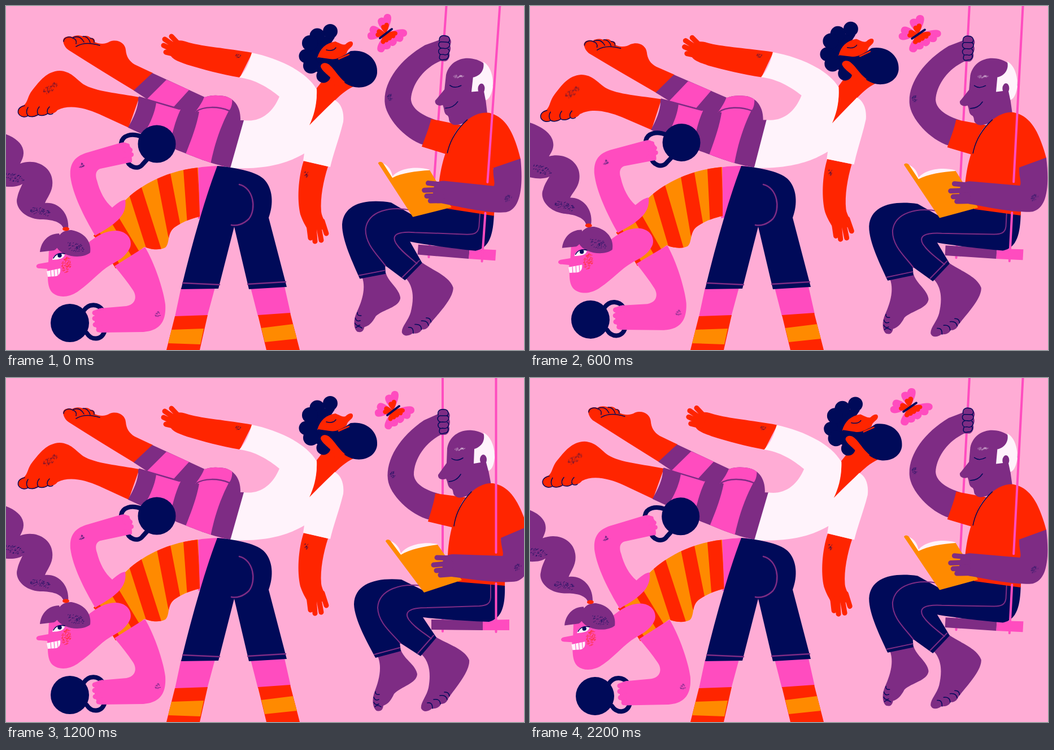
These frames come from a looping animation (917 by 611 pixels, 2400 ms). An HTML page:

```html
<!DOCTYPE html>
<html lang="en">
<head>
<meta charset="utf-8">
<title>Three friends at play</title>
<style>
html, body { margin: 0; width: 100%; height: 100%; overflow: hidden; background: #ffacd5; }
svg { display: block; width: 100vw; height: 100vh; }
path, line, circle, ellipse { fill: none; stroke-linecap: round; }
.red { fill: #ff2500 } .orange { fill: #ff8a00 } .navy { fill: #000a59 }
.purple { fill: #7e2c84 } .pink { fill: #ff4cbf } .white { fill: #fff3fb }
.sRed { stroke: #ff2500 } .sNavy { stroke: #000a59 } .sPurple { stroke: #7e2c84 }
.sPink { stroke: #ff4cbf } .sWhite { stroke: #fff3fb }
.thin { stroke-width: 1.5 } .seam { stroke-width: 2 } .finger { stroke-width: 9 }
.grain { stroke-width: .8; opacity: .75 }
</style>
</head>
<body>
<svg viewBox="0 0 917 611" preserveAspectRatio="none">
<defs>
  <clipPath id="tank"><path d="M340,287C290,292 240,315 210,346L155,408L165,418L194,466L245,428C258,433 272,434 282,429C291,421 284,402 300,392C315,382 330,377 343,374Z"/></clipPath>
  <clipPath id="trunks"><path d="M259,119L352,162C365,157 378,159 386,160C406,164 416,182 415,203L422,203C418,235 412,265 397,287C360,280 335,268 303,256L216,216C226,198 235,180 234,162L249,165L226,150Z"/></clipPath>
</defs>

<g id="flyer">
  <!-- legs -->
  <path class="red" d="M101,62C101,54 112,53 117,55C124,51 131,52 136,54C142,52 147,53 150,57C155,56 158,60 157,64C166,68 176,68 184,63C198,58 211,66 212,78C213,90 218,98 228,104L260,119L228,151C190,128 150,103 112,79C105,75 102,68 101,62Z"/>
  <path class="sNavy thin" d="M102,63C102,56 112,53 118,57Q126,59 124,67M124,72Q140,62 166,70M119,56Q131,51 138,64M136,54Q145,53 149,65M149,57Q157,58 156,65"/>
  <path class="red" d="M95,115C72,116 60,133 47,149C38,160 39,170 32,176C24,178 20,184 22,191C26,198 35,198 39,195C45,199 54,197 57,193C63,196 71,195 74,191C82,193 88,189 91,185C112,174 140,181 165,192L217,216L236,162C200,155 158,152 137,139C122,128 115,116 95,115Z"/>
  <path class="sNavy thin" d="M33,177C23,179 20,185 22,191C26,198 35,198 39,195Q34,188 39,180M39,195Q46,199 57,193Q53,186 59,179M57,193Q65,197 74,191Q71,185 77,179M74,191Q79,194 83,191"/>
  <!-- trunks -->
  <g clip-path="url(#trunks)">
    <path class="purple" d="M200,90H440V300H200Z"/>
    <path class="pink" d="M284,131L249,166L297,179L325,148ZM266,171L309,184C299,205 293,230 289,254L240,232C255,212 264,188 266,171ZM338,187C350,178 376,178 395,185C379,215 368,250 362,281L318,263C327,240 337,215 342,188ZM335,188C346,174 350,165 352,158H398C404,170 397,185 395,185C376,177 352,178 335,188Z"/>
  </g>
  <path class="sPurple" stroke-width="2.5" d="M236,162L307,183M337,187C350,178 376,178 395,186"/>
  <!-- arms -->
  <path class="red" d="M436,83C390,75 350,72 324,65C315,62 303,58 296,66L290,82C290,95 308,99 320,104C350,113 380,121 414,127Z"/>
  <path class="sRed finger" d="M308,70L293,54M304,75L281,59M300,80L279,70M300,86L283,82"/>
  <path class="red" d="M527,275C517,305 515,345 521,370C525,382 530,390 534,397H566C569,388 559,376 558,365C556,340 562,310 570,285Z"/>
  <path class="sRed finger" d="M536,388L539,412M545,390L547,418M553,388L558,416M560,382L567,404"/>
  <!-- head -->
  <path class="red" d="M536,213C548,185 551,165 550,146L570,120L617,142C600,150 590,160 580,170C568,180 548,200 536,213Z"/>
  <path class="navy" d="M545,52L582,56L566,80L572,126L548,116L530,90Z"/>
  <circle class="navy" cx="574" cy="45" r="13"/>
  <circle class="navy" cx="551" cy="53" r="13.5"/>
  <circle class="navy" cx="538" cy="66" r="14"/>
  <circle class="navy" cx="531" cy="89" r="12.5"/>
  <circle class="navy" cx="540" cy="106" r="14"/>
  <circle class="navy" cx="562" cy="124" r="12.5"/>
  <path class="red" d="M551,92C556,75 566,66 583,63C591,66 596,70 601,68C608,61 615,62 614,68C613,74 604,76 603,84L588,97L570,97Z"/>
  <path class="navy" d="M552,91L573,94C583,96 593,92 610,80C638,76 659,95 657,119C655,139 633,149 613,143C597,138 586,125 578,112L556,106Z"/>
  <path class="red" d="M557,108C557,100 568,99 574,106C582,113 587,124 600,135L582,145C581,125 562,121 557,108Z"/>
  <path class="sRed" stroke-width="2.5" d="M589,94L607,86"/>
  <path class="sNavy thin" d="M567,78Q579,81 584,74"/>
  <!-- shirt -->
  <path class="white" d="M435,83C475,91 530,113 550,148C551,175 545,195 537,212L582,167C593,173 599,187 597,206C590,235 580,260 574,286L526,275L528,262C505,275 470,291 397,288L421,203C450,207 472,190 484,161C465,145 440,130 413,127C423,117 431,100 435,83Z"/>
  <g class="grain" data-grain="78 147 15 6 -35 50 sNavy;411 89 6 3 5 16 sNavy;531 299 3 6 0 18 sNavy"></g>
</g>

<g id="lifter">
  <path class="pink" d="M336,288C350,285 365,284 385,284L350,376L340,378Z"/>
  <g clip-path="url(#tank)">
    <path class="orange" d="M140,270H360V480H140Z"/>
    <path class="sRed" stroke-width="25" d="M325,270L334,395M275,280L299,405M223,310L266,445"/>
    <path class="sRed" stroke-width="16" d="M184,365L238,455M152,395L202,475"/>
  </g>
  <!-- raised arm and weight -->
  <circle class="navy" cx="267" cy="245" r="33.5"/>
  <path class="sNavy" stroke-width="8" d="M240,232C222,225 206,230 204,243M213,270C216,287 234,292 242,281L252,270"/>
  <path class="pink" d="M158,408C139,376 118,335 114,303C112,277 124,266 145,260L203,243C214,240 218,247 222,253L223,277L167,289C158,292 158,302 161,310C166,330 175,347 188,358C195,352 203,345 211,344C214,360 206,374 195,383C182,395 170,400 158,408Z"/>
  <path class="sPink" stroke-width="8" d="M207,247L215,248M210,255L220,256M212,264L222,264M210,273L219,274"/>
  <!-- lower arm and weight -->
  <circle class="navy" cx="113" cy="563" r="34"/>
  <path class="sNavy" stroke-width="8" d="M137,542C147,526 164,530 171,540M143,581C151,594 169,594 174,579"/>
  <path class="pink" d="M192,462L246,428C262,455 278,500 282,530C284,561 272,577 243,579L166,580L157,568V543C163,535 171,537 178,536L213,533C230,530 232,516 225,505C215,490 203,475 192,462Z"/>
  <path class="sPink" stroke-width="9" d="M170,541L157,545M170,552L157,555M170,563L158,566M173,574L164,575"/>
  <!-- head -->
  <g id="braid">
    <path class="purple" d="M102,396C98,381 75,379 60,379C30,377 15,355 20,340C22,330 25,325 29,316C18,323 0,323 -40,314V220C0,222 32,238 31,262C31,268 28,274 25,280C52,270 80,285 82,310C84,328 74,338 69,350C92,347 113,368 110,396Z"/>
    <g class="grain" data-grain="60 366 19 7 12 55 sNavy;14 305 18 7 15 50 sNavy"></g>
  </g>
  <path class="pink" d="M76,432C90,422 130,440 145,421C160,409 175,399 195,399C214,400 224,414 220,428C213,445 199,452 185,460C166,471 149,492 130,505C114,518 94,519 83,510C72,500 75,482 73,467L61,466C53,467 51,460 58,458L75,455Z"/>
  <path class="purple" d="M60,437C62,418 75,404 94,404C99,418 93,430 85,434ZM90,429C88,410 98,397 116,398C140,402 152,420 149,438C135,450 100,446 90,429Z"/>
  <ellipse class="red" cx="106" cy="396" rx="6" ry="3.5"/>
  <path class="white" d="M82,451C84,441 95,438 104,441C103,449 94,450 82,451ZM72,471L96,466C97,474 94,479 88,480L74,481Z"/>
  <circle class="navy" cx="95" cy="443" r="3.7"/>
  <path class="sNavy thin" d="M84,448C88,440 96,438 104,440"/>
  <path class="sPink" stroke-width="1" d="M79,470L80,481M85,468L86,480M91,467L92,478"/>
  <g class="grain" data-grain="106 460 8 14 12 95 sRed;122 429 16 9 20 45 sNavy;133 284 4 5 30 16 sNavy;268 548 4 5 20 16 sNavy"></g>
</g>

<!-- standing legs -->
<path class="pink" d="M310,500H370L356,552H299ZM433,500L493,498L504,547L446,551Z"/>
<path class="red" d="M299,551L357,549L343,611H284ZM446,549L503,545L520,611H461Z"/>
<path class="orange" d="M293,575L350,573L344,601L287,599ZM452,572L508,565L515,591L458,597Z"/>
<path class="navy" d="M374,284C400,286 441,293 456,307C473,324 474,352 465,376L497,499L430,503L404,392L376,502L310,503C325,440 349,350 374,284Z"/>
<path class="sPurple" stroke-width="2.5" d="M413,317C438,323 444,360 430,378C420,388 408,391 399,389M313,492L378,495M428,494L495,490"/>

<g id="swing">
  <path class="sPink" stroke-width="4" d="M773,-40V450"/>
  <path class="purple" d="M753,429L844,430V448L753,447Z"/>
  <path class="pink" d="M844,430L891,429V448L844,448Z"/>
  <!-- raised arm -->
  <path class="purple" d="M750,252C715,243 679,207 676,180C672,145 697,104 740,75L767,63L776,98C742,112 722,145 722,172C724,190 745,200 768,206Z"/>
  <path class="purple" d="M766,60C766,53 782,53 783,60C787,64 786,69 784,72C787,76 786,82 784,85C787,91 783,101 777,101H769C764,96 763,66 766,60Z"/>
  <path class="sNavy thin" d="M765,66C763,56 771,55 776,56C784,56 786,68 778,67H768M768,67C761,69 764,80 773,78C783,80 788,69 780,67M768,79C762,81 765,92 773,89C783,92 787,80 781,79M768,90C765,99 770,100 776,98C783,98 784,91 782,88"/>
  <!-- feet -->
  <path class="purple" d="M658,494C667,515 659,540 653,556C647,571 649,586 656,591C664,593 667,589 668,582C676,579 681,574 687,561C699,548 727,543 728,526C725,509 705,500 699,483ZM735,490C751,505 752,528 748,550C745,565 733,577 735,587C739,595 749,592 754,587C762,588 768,584 770,579C777,579 781,575 783,569C795,551 822,521 820,501C812,481 780,472 761,460Z"/>
  <path class="sNavy thin" d="M654,557Q653,563 661,562M651,567Q653,574 660,571M651,576Q654,582 660,579M653,584Q657,579 664,584M746,577Q755,575 755,587M757,571Q768,569 769,579M768,564Q779,562 781,571M776,558Q784,557 785,565"/>
  <!-- trousers -->
  <path class="navy" d="M883,366L800,355L740,378L700,358C655,354 617,365 616,402C617,430 640,470 654,497L699,485L697,470L734,494L762,461L738,425C760,428 820,432 855,433C880,427 884,400 883,366Z"/>
  <path class="sPurple seam" d="M858,366V390C857,402 850,404 838,405L745,408C715,408 704,415 713,429C723,443 739,452 753,463M736,369C700,364 660,375 658,408C659,435 682,452 698,471M652,491L697,479M729,489L757,457"/>
  <!-- shirt and head -->
  <path class="red" d="M760,205L814,212C802,225 796,245 793,266L747,255C752,238 758,220 760,205Z"/>
  <path class="purple" d="M781,125C785,102 805,91 825,93C850,95 863,113 865,138L854,164L859,190L822,207C813,210 803,216 796,210C790,207 793,201 789,197C781,194 783,187 779,179C772,182 764,179 765,172L780,151Z"/>
  <path class="white" d="M828,152L829,126C843,122 849,110 845,97C859,103 866,125 865,142C863,158 859,163 854,165L850,150H840Z"/>
  <ellipse class="purple" cx="845" cy="145" rx="6" ry="9"/>
  <path class="sNavy thin" d="M789,143Q798,149 809,142M784,184Q798,183 805,171"/>
  <path class="red" d="M822,204C835,192 848,186 862,187C890,192 907,215 923,265L876,285C882,310 884,340 883,369L800,362L782,315C785,262 800,225 822,204Z"/>
  <path class="sNavy thin" d="M824,202C808,218 796,240 793,263"/>
  <!-- book -->
  <path class="white" d="M679,289C690,292 698,302 700,316ZM697,315C704,299 735,289 764,295L755,306Z"/>
  <path class="orange" d="M672,290C673,286 679,286 682,291L699,314C715,304 740,299 764,296L782,322L807,359L740,381Z"/>
  <!-- forearm -->
  <path class="purple" d="M923,264L876,284C876,300 882,310 879,316L790,313C780,314 774,318 773,328C770,345 780,353 797,354C840,360 880,365 904,361C928,354 932,318 923,264Z"/>
  <path class="sPurple finger" d="M790,320L763,319M788,329L757,332M788,340L762,342M795,348L769,350"/>
  <path class="sPink" stroke-width="4" d="M867.5,-40V310M867.5,365V451"/>
  <g class="grain" data-grain="684 172 4 7 0 25 sNavy;906 337 7 5 -40 26 sNavy;803 127 10 2.5 -4 22 sWhite"></g>
</g>

<g id="butterfly">
  <g id="wings"></g>
  <path class="sNavy" stroke-width="4" d="M-10,8L11,-8"/>
</g>
</svg>

<script>
const $ = id => document.getElementById(id);

// Seeded short scratches scattered in tilted ellipses
let seed = 7;
const rnd = () => (seed = seed * 16807 % 2147483647) / 2147483647;
for (const g of document.querySelectorAll("[data-grain]")) {
  g.innerHTML = g.dataset.grain.split(";").map(spec => {
    const parts = spec.split(" "), color = parts.pop();
    const [x, y, rx, ry, tilt, count] = parts.map(Number);
    let d = "";
    for (let i = 0; i < count; i++) {
      const a = rnd() * 6.283, r = Math.sqrt(rnd());
      d += `M${(rx * r * Math.cos(a)).toFixed(1)},${(ry * r * Math.sin(a)).toFixed(1)}l${(rnd() * 2).toFixed(1)},-1`;
    }
    return `<path class="${color}" d="${d}" transform="translate(${x} ${y}) rotate(${tilt})"/>`;
  }).join("");
}

// Teardrop petals from the body to each tip, with smaller red ones on top
const tips = [[4, -35], [-9, -28], [-28, -9], [-32, 5], [38, -1], [31, 10], [17, 20], [3, 28], [-10, 33]];
const petal = (color, size, w) => ([x, y]) => {
  const l = Math.hypot(x, y) * size, angle = Math.atan2(x, -y) * 180 / Math.PI;
  return `<path class="${color}" transform="rotate(${angle})" d="M0,0C${w / 2},${-l * .4} ${w},${-l} 0,${-l}C${-w},${-l} ${-w / 2},${-l * .4} 0,0Z"/>`;
};
$("wings").innerHTML = [...tips.map(petal("pink", 1, 12)), ...tips.map(petal("red", .55, 7))].join("");

const STEP = 200, STEPS = 12;
const flutterX = [672, 671, 672, 687, 695, 693, 685, 688, 678, 674, 671, 672];
const flutterY = [49, 50, 49, 50, 54, 57, 58, 55, 55, 55, 54, 52];
const turn = (id, angle, x, y) => $(id).setAttribute("transform", `rotate(${angle} ${x} ${y})`);

function pose(k) {
  const bob = 3 - Math.abs((k + 9) % STEPS - 6);   // triangle wave, -3 to 3
  turn("flyer", .45 * bob, 388, 302);
  turn("lifter", -.43 * bob, 382, 292);
  turn("braid", -1.3 * bob, 106, 396);
  turn("swing", Math.max(0, 5 - Math.abs((k + 5) % STEPS - 6)), 818, 95);
  const open = k % 2 ? "1.07 .97" : "1 1";
  $("butterfly").setAttribute("transform", `translate(${flutterX[k]} ${flutterY[k]}) scale(${open})`);
}

let shown = -1;
function frame() {
  const k = Math.floor(performance.now() / STEP) % STEPS;
  if (k !== shown) pose(shown = k);
  requestAnimationFrame(frame);
}
frame();
</script>
</body>
</html>
```
